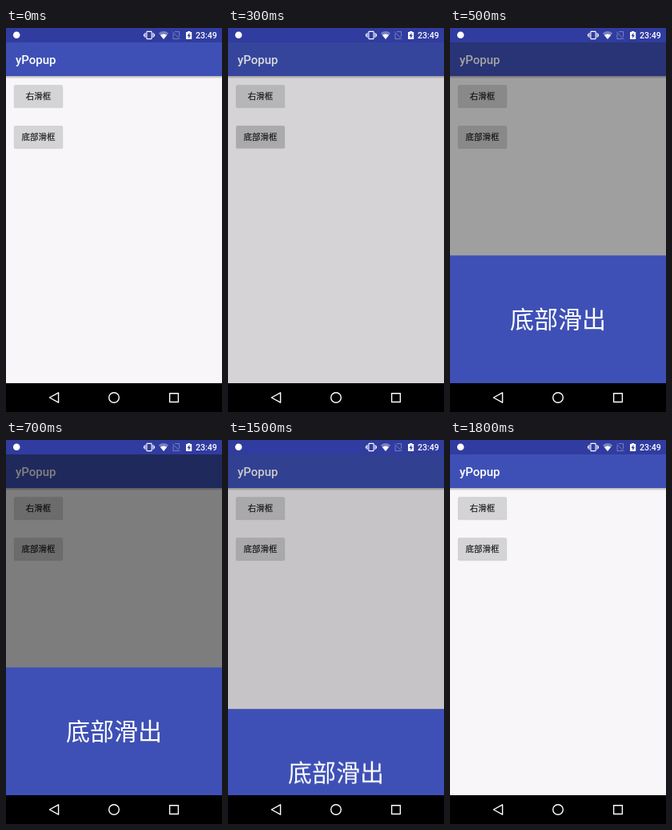
Write an HTML page that moves like this. It is 270 by 480 pixels and loops after 1.9 s.

```html
<!DOCTYPE html>
<html lang="zh-CN">
<head>
<meta charset="utf-8">
<title>yPopup</title>
<style>
  html, body { margin: 0; width: 100%; height: 100%; overflow: hidden; background: #000; }
  svg { display: block; width: 100vw; height: 100vh; }
  .latin { font-family: Roboto, sans-serif; font-weight: 500; fill: #fff; }
  .cjk { font-family: "Noto Sans CJK SC", "Noto Sans CJK", sans-serif; text-anchor: middle; }
  .label { font-size: 10.5px; font-weight: 500; fill: #1c1c1c; stroke: #1c1c1c; stroke-width: .2; }
  .line { fill: none; stroke: #fff; }
</style>
</head>
<body>
<svg viewBox="0 0 270 480">
  <defs>
    <linearGradient id="fade" x2="0" y2="1">
      <stop offset="0" stop-opacity=".28"/>
      <stop offset="1" stop-opacity="0"/>
    </linearGradient>
    <clipPath id="content"><rect y="18" width="270" height="426"/></clipPath>
    <g id="button">
      <rect x="9.6" y="71.7" width="61.8" height="28.6" rx="2" opacity=".07"/>
      <rect x="10" y="71.5" width="61" height="28" rx="1.5" opacity=".13"/>
      <rect x="10.2" y="71.3" width="60.6" height="27.4" rx="1.5" fill="#d4d4d6"/>
    </g>
  </defs>

  <rect width="270" height="18" fill="#303c9f"/>

  <g clip-path="url(#content)">
    <rect y="18" width="270" height="426" fill="#f8f6f9"/>
    <rect y="60" width="270" height="3.5" fill="url(#fade)"/>
    <rect y="18" width="270" height="42" fill="#3e50b5"/>
    <text class="latin" x="12" y="44.7" font-size="15">yPopup</text>

    <use href="#button"/>
    <text class="cjk label" x="40.5" y="89.2">右滑框</text>
    <use href="#button" y="51"/>
    <rect id="press" x="10.2" y="122.3" width="60.6" height="27.4" rx="1.5" opacity="0"/>
    <text class="cjk label" x="40.5" y="140.2">底部滑框</text>

    <rect id="dim" y="18" width="270" height="426" opacity="0"/>
    <g id="panel" style="transform: translateY(160px)">
      <rect y="284.3" width="270" height="160" fill="#3e50b5"/>
      <text class="cjk" x="135" y="375.1" font-size="30" fill="#fff">底部滑出</text>
    </g>
  </g>

  <!-- status icons -->
  <circle cx="13.2" cy="8.8" r="4.3" fill="#fff"/>
  <g class="line" stroke-width="1.1">
    <rect x="175.9" y="4.4" width="6.2" height="9.2" rx=".7"/>
    <path d="M174 6v6M184 6v6M172.5 7.4v3.2M185.5 7.4v3.2"/>
  </g>
  <path d="M190.8 6.4Q197 1.8 203.2 6.4L197 14Z" fill="#fff" opacity=".35"/>
  <path d="M192.9 9Q197 6 201.1 9L197 14Z" fill="#fff"/>
  <path class="line" stroke-width=".9" opacity=".4"
        d="M208 4.6L217.6 14.2M211 4.6H216.6V11M209 7V13.6H215.6"/>
  <path d="M225 5H227V4H230.2V5H232.2V14H225Z" fill="#fff"/>
  <path d="M229.4 6L226.5 10H228.2V13L230.9 9H229.4Z" fill="#303c9f"/>
  <text class="latin" x="237" y="12.9" font-size="10.6">23:49</text>

  <!-- navigation -->
  <rect y="444" width="270" height="36"/>
  <g class="line" stroke-width="1.4" stroke-linejoin="round">
    <path d="M65.6 455.8V468.2L54.4 462Z"/>
    <circle cx="135" cy="462" r="6.3"/>
    <rect x="204.6" y="456.7" width="10.8" height="10.8"/>
  </g>
</svg>
<script>
const LOOP = 1900, TICK = 100, CLOSE = 1400, HEIGHT = 160;

// progress from 0 to 1, and the same eased in and out
const ramp = (t, start, time) => Math.min(1, Math.max(0, (t - start) / time));
const ease = (t, start, time) => (1 - Math.cos(Math.PI * ramp(t, start, time))) / 2;

const dim = t => t < CLOSE ? .5 * ease(t, 50, 700) : .25 * (1 - ease(t, CLOSE, 350));
const shift = t => HEIGHT * (1 - ease(t, 300, 132) + ease(t, CLOSE, 260));
const press = t => .065 * Math.sin(Math.PI * ramp(t, 0, 500));

// the screen refreshes once per tick and holds in between
function play(id, style) {
  const frames = [];
  for (let t = 0; t <= LOOP; t += TICK) {
    frames.push({ offset: t / LOOP, easing: 'step-end', ...style(t) });
  }
  document.getElementById(id).animate(frames, { duration: LOOP, iterations: Infinity });
}

play('dim', t => ({ opacity: dim(t) }));
play('press', t => ({ opacity: press(t) }));
play('panel', t => ({ transform: `translateY(${shift(t)}px)` }));
</script>
</body>
</html>
```
